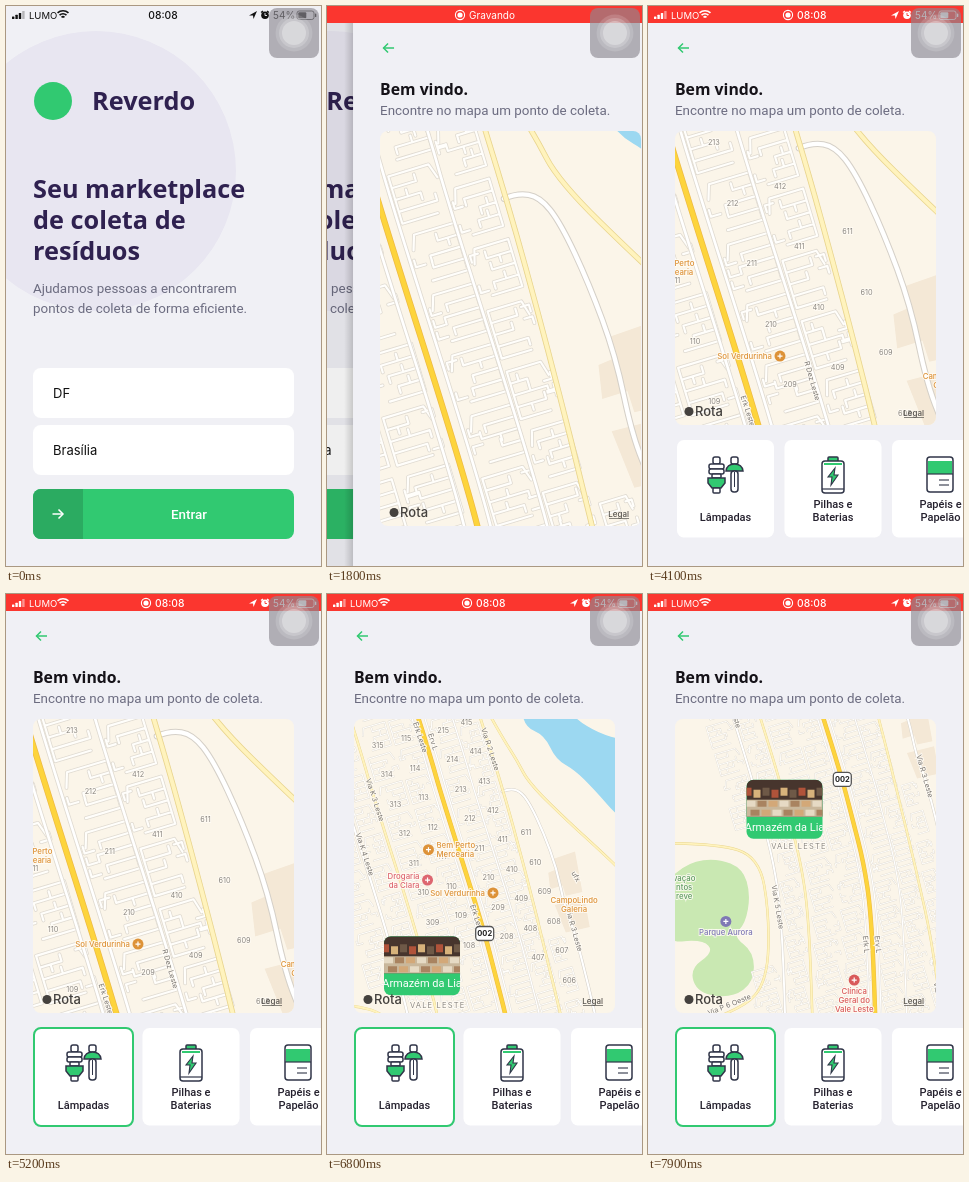
Write an HTML page with a canvas that moves like this. It is 315 px wide and 560 px high and loops after 8 s.

```html
<!DOCTYPE html>
<html lang="pt-BR">
<head>
<meta charset="utf-8">
<title>Coleta</title>
<style>
html, body { margin: 0; width: 100%; height: 100%; overflow: hidden; background: #f0f0f5; }
canvas { display: block; width: 315px; height: 560px; }
</style>
</head>
<body>
<canvas id="stage"></canvas>
<script>
const W = 315, H = 560, LOOP = 8000;
const canvas = document.getElementById('stage');
const ctx = canvas.getContext('2d');
const dpr = Math.max(1, window.devicePixelRatio || 1);
canvas.width = W * dpr;
canvas.height = H * dpr;

const GREEN = '#31c971', INK = '#2f2150', GREY = '#6c6c80', PAGE = '#f0f0f5';
const TITLE = '"Noto Sans", "Open Sans", sans-serif';
const BODY = 'Roboto, sans-serif';
const UI = 'Inter, sans-serif';

const clamp = v => Math.min(1, Math.max(0, v));
const mix = (a, b, k) => a + (b - a) * k;
const smooth = k => k * k * (3 - 2 * k);

function text(s, x, y, size, font, color, align = 'left', weight = 400) {
  ctx.font = `${weight} ${size}px ${font}`;
  ctx.fillStyle = color;
  ctx.textAlign = align;
  ctx.textBaseline = 'alphabetic';
  ctx.fillText(s, x, y);
}
function box(x, y, w, h, r, fill) {
  ctx.beginPath();
  ctx.roundRect(x, y, w, h, r);
  if (fill) { ctx.fillStyle = fill; ctx.fill(); }
}
function disc(x, y, r, fill) {
  ctx.beginPath();
  ctx.arc(x, y, r, 0, 7);
  ctx.fillStyle = fill;
  ctx.fill();
}
function line(color, width, ...pts) {
  ctx.beginPath();
  pts.forEach(([x, y]) => ctx.lineTo(x, y));
  ctx.strokeStyle = color;
  ctx.lineWidth = width;
  ctx.stroke();
}

// ---- Map geometry, in map units ----
const AXIS = [[28, 50], [52, 125], [60, 150], [80, 214], [91, 253], [136, 395], [150, 450],
  [163, 500], [172, 560], [177, 680], [178, 760]];
function axisX(y) {
  let i = 1;
  while (i < AXIS.length - 1 && AXIS[i][0 + 1] < y) i++;
  const [a, b] = [AXIS[i - 1], AXIS[i]];
  return mix(a[0], b[0], (y - a[1]) / (b[1] - a[1]));
}
function curve(pts, closed) {
  const p = new Path2D();
  p.moveTo(...pts[0]);
  for (let i = 1; i < pts.length - 1; i++) {
    const [x, y] = pts[i], [nx, ny] = pts[i + 1];
    p.quadraticCurveTo(x, y, (x + nx) / 2, (y + ny) / 2);
  }
  p.lineTo(...pts[pts.length - 1]);
  if (closed) p.closePath();
  return p;
}
const beside = dx => curve(AXIS.map(([x, y]) => [x + dx, y]));

const lake = curve([[140, 60], [152, 105], [162, 128], [178, 148], [180, 178], [203, 188], [215, 214],
  [236, 226], [256, 246], [288, 282], [340, 320], [340, 205], [288, 193], [262, 186], [236, 170],
  [224, 152], [203, 150], [208, 125], [200, 60]], true);
const park = curve([[-59, 514], [-43, 500], [-8, 496], [21, 508], [30, 538], [24, 573], [9, 587],
  [34, 606], [34, 641], [9, 660], [-32, 655], [-42, 626], [-13, 606], [-26, 591], [-75, 596], [-75, 520]], true);
const tan = new Path2D('M207 337L221 331L225 350L209 355ZM213 322L236 314L244 358L226 362ZM214 372L246 364L252 396L226 402Z');
const roadL2 = curve([[100, 60], [119, 125], [156, 240], [181, 331], [203, 419], [225, 510], [245, 600], [262, 740]]);
const roadL3 = curve([[157, 249], [164, 246], [176, 248], [187, 262], [202, 294], [216, 332], [225, 375],
  [235, 399], [252, 465], [268, 538], [300, 700]]);
const roadL4 = curve([[108, 80], [125, 125], [140, 160], [160, 195], [173, 215], [186, 240], [230, 283], [260, 310], [340, 386]]);
const parkRoad = curve([[-80, 478], [-10, 478], [40, 494], [52, 560], [50, 640], [20, 674], [-80, 705]]);

let seed = 11;
const rnd = () => (seed = (seed * 16807) % 2147483647) / 2147483647;

// Each block is a short comb of cul-de-sacs around a side street.
const lanes = new Path2D();
function block(cx, cy, w, h) {
  const go = (...pts) => pts.forEach(([x, y], i) =>
    lanes[i ? 'lineTo' : 'moveTo'](cx + x + 0.3 * y, cy + y - 0.3 * x));
  const side = rnd() < 0.5 ? -1 : 1, e = side * w / 2;
  go([e, -h / 2], [e, h / 2], [-e * 0.5, h / 2]);
  go([e, -h / 2], [-e * 0.7, -h / 2], [-e * 0.9, -h / 2 + h * 0.3]);
  for (let i = 1; i < 4; i++) {
    const y = -h / 2 + i * h / 4, x = e * (rnd() * 0.9 - 0.7), d = (rnd() < 0.5 ? -1 : 1) * h / 7;
    go([e, y], [x, y], [x, y + d]);
    if (rnd() < 0.6) go([(e + x) / 2, y], [(e + x) / 2, y - d]);
    if (rnd() < 0.5) go([-e, y], [-e, y + d], [-e * 0.6, y + d]);
  }
}
[[-20, 25], [-53, 27], [23, 25], [51, 21], [-90, 20], [-126, 28]].forEach(([dx, w], c) => {
  for (let k = -5; k < 15; k++) {
    const cy = 246 + 32 * k + (c % 2) * 8, cx = axisX(cy) + dx;
    if (c > 3 && cx < 48 && cy > 470) continue;
    block(cx, cy, w, 25);
  }
});
for (let k = 0; k < 6; k++) block(228 + k * 14, 118 + k * 10, 18, 18);
for (let k = 0; k < 8; k++) block(axisX(420 + k * 34) + 77, 420 + k * 34, 16, 24);

const frontage = [beside(-7), beside(7), beside(37)];
const pale = [beside(-74), parkRoad, roadL2, roadL4];
const white = [beside(-106), roadL3];
const main = beside(0);

// ---- Camera: time, scale, centre ----
const CAM = [[0, 1.89, 160.5, 317.7], [5400, 1.89, 160.5, 317.7], [6050, 1, 157.5, 272], [6250, 1, 157.5, 272],
  [7350, 0.85, 118.2, 387.2], [7430, 0.85, 118.2, 387.2], [7900, 0.85, 94.7, 504.8], [8000, 0.85, 94.7, 504.8]];
function camera(t) {
  let i = 1;
  while (i < CAM.length - 1 && CAM[i][0] < t) i++;
  const a = CAM[i - 1], b = CAM[i], k = smooth(clamp((t - a[0]) / (b[0] - a[0])));
  return { s: a[1] * Math.pow(b[1] / a[1], k), x: mix(a[2], b[2], k), y: mix(a[3], b[3], k) };
}

function cased(paths, edge, fill, outer, inner) {
  for (const [color, width] of [[edge, outer], [fill, inner]]) {
    ctx.strokeStyle = color;
    ctx.lineWidth = width;
    paths.forEach(p => ctx.stroke(p));
  }
}
function drawRoads(s) {
  ctx.lineJoin = ctx.lineCap = 'round';
  ctx.fillStyle = '#f4e8d6';
  ctx.fill(tan);
  ctx.fillStyle = '#c9e8b2';
  ctx.fill(park);
  ctx.fillStyle = '#9cd8f1';
  ctx.fill(lake);
  cased([lanes], '#e0dbd2', '#fffefb', 2, 1.15);
  cased(frontage, '#e0dbd2', '#fff', 2.3, 1.4);
  cased(white, '#d5d0c8', '#fff', 3.4, 2.3);
  cased(pale, '#e9d58f', '#fff3bd', 3, 2.1);
  cased([main], '#eebb45', '#fdd43c', 1.7 + 3 / s, 1.2 + 2.4 / s);
}

const STREETS = [
  ['Via K 3 Leste', 19, 258, 72, 0, 0.98], ['Via K 4 Leste', 8, 317, 72, 0, 0.98],
  ['Via K 5 Leste', 62, 553, 80, 0, 0.98], ['Via R 3 Leste', 235, 399, 74, 0, 9],
  ['Via R 2 Leste', 144, 203, 72, 0.8, 1.5], ['Via R 4 Leste', 164, 190, 62, 0.95, 1.5],
  ['R Dez Leste', 164, 372, 74, 1.4, 9], ['Erk Leste', 68, 190, 72, 0.92, 1.4],
  ['Erk Leste', 130, 388, 72, 0.92, 9], ['Erv L', 82, 195, 72, 0.92, 1.4],
  ['Erk L', 166, 597, 84, 0, 0.98], ['Erv L', 180, 597, 84, 0, 0.98],
  ['Via R 2', 251, 655, 78, 0, 0.98], ['Via P 6 Oeste', 5, 668, -22, 0, 0.98], ['ufx', 237, 341, 60, 0.92, 1.6]
];
const ORANGE = '#dd9238', PINK = '#dd6670', PURPLE = '#7f78b5';
// lines, position, text offset, alignment, colour, scale range, icon
const PLACES = [
  [['Bem Perto', 'Mercearia'], 77, 312, 8, 'left', ORANGE, 0.92, 9, 1],
  [['Sol Verdurinha'], 147, 359, -8, 'right', ORANGE, 0.92, 9, 1],
  [['Drogaria', 'da Clara'], 76, 345, -8, 'right', PINK, 0.92, 9, 1],
  [['CampoLindo', 'Galeria'], 235, 372, 0, 'center', ORANGE, 0.92, 9, 0],
  [['Parque Aurora'], 1, 570, 0, 'center', PURPLE, 0, 0.98, 2],
  [['Clínica', 'Geral do', 'Vale Leste'], 152, 639, 0, 'center', '#d95a5a', 0, 0.98, 2],
  [['vação', 'ntos', 'reve'], -48, 530, 0, 'center', '#5f9c62', 0, 0.98, 0]
];

function drawLabels(cam, cx, cy) {
  const at = (x, y) => [cx + (x - cam.x) * cam.s, cy + (y - cam.y) * cam.s];
  function halo(s, x, y, size, color, align, weight) {
    ctx.font = `${weight || 400} ${size}px ${UI}`;
    ctx.textAlign = align;
    ctx.textBaseline = 'alphabetic';
    ctx.strokeStyle = 'rgba(255,252,244,.85)';
    ctx.lineWidth = 2;
    ctx.strokeText(s, x, y);
    ctx.fillStyle = color;
    ctx.fillText(s, x, y);
  }
  const shown = (lo, hi) => cam.s >= lo && cam.s <= hi;

  if (cam.s > 0.92) {
    [[213, 246, 23, 217], [412, 269, 51, 415], [611, 293, 79, 611], [113, 255, -20, 116], [313, 262, -53, 315]]
      .forEach(([n, y0, dx, top]) => {
        for (let k = n - top; k < 6; k++) {
          const y = y0 + 32 * k;
          const [x, sy] = at(axisX(y) + dx, y);
          halo(n - k, x, sy + 3, 7.3, '#8b8782', 'center');
        }
      });
  }
  STREETS.forEach(([s, x, y, deg, lo, hi]) => {
    if (!shown(lo, hi)) return;
    ctx.save();
    ctx.translate(...at(x, y));
    ctx.rotate(deg * Math.PI / 180);
    halo(s, 0, 2.5, 7.2, '#77736f', 'center');
    ctx.restore();
  });
  PLACES.forEach(([rows, x, y, off, align, color, lo, hi, icon]) => {
    if (!shown(lo, hi)) return;
    const [px, py] = at(x, y);
    if (icon) {
      disc(px, py, 5.5, color);
      line('#fff', 1.2, [px - 2.5, py], [px + 2.5, py]);
      line('#fff', 1.2, [px, py - 2.5], [px, py + 2.5]);
    }
    const top = icon === 2 ? 14 : 3 - (rows.length - 1) * 4.5;
    rows.forEach((s, i) => halo(s, px + off, py + top + i * 9, 7.8, color, align, 500));
  });
  if (cam.s < 0.98) {
    const [x, y] = at(87, 481);
    ctx.letterSpacing = '1.2px';
    halo('VALE LESTE', x, y + 3, 7.5, '#8b8782', 'center');
    ctx.letterSpacing = '0px';
  }
  if (cam.s < 1.4) {
    const [x, y] = at(138, 403);
    box(x - 9, y - 7, 18, 14, 3.5, '#fff');
    ctx.strokeStyle = '#555';
    ctx.lineWidth = 1.3;
    ctx.stroke();
    text('002', x, y + 2.8, 7.5, UI, '#222', 'center', 700);
  }
}

function drawMarker(t, x, y) {
  ctx.save();
  ctx.translate(x - 38, y - 29.5);
  box(0, 0, 76, 59, 7, GREEN);
  ctx.clip();
  if (t > 6600) {
    ctx.fillStyle = '#47352d';
    ctx.fillRect(0, 0, 76, 37);
    for (let i = 0; i < 9; i++) {
      ctx.fillStyle = ['#b0533a', '#d7b27b', '#6e5947'][i % 3];
      ctx.fillRect(i * 9 - 2, 8 + i % 2 * 2, 7, 8);
    }
    ctx.fillStyle = '#c9b79b';
    ctx.fillRect(0, 20, 76, 17);
    for (let i = 0; i < 14; i++) {
      ctx.fillStyle = ['#e6dac4', '#a98360', '#d3a878'][i % 3];
      ctx.fillRect(i % 7 * 11 + (i > 6 ? 4 : 0), i > 6 ? 30 : 21, 9, 6);
    }
  }
  text('Armazém da Lia', 38, 51, 11, BODY, '#fff', 'center');
  ctx.restore();
}

function drawMap(t, h) {
  const cam = camera(t), cx = 157.5, cy = 125 + h / 2;
  ctx.save();
  box(27, 125, 261, h, 8, '#fbf5e9');
  ctx.clip();
  ctx.save();
  ctx.translate(cx, cy);
  ctx.scale(cam.s, cam.s);
  ctx.translate(-cam.x, -cam.y);
  drawRoads(cam.s);
  ctx.restore();
  if (t > 2400) drawLabels(cam, cx, cy);
  if (t > 5000) drawMarker(t, cx + (70 - cam.x) * cam.s, cy + (438 - cam.y) * cam.s);
  const base = 125 + h - 9;
  disc(41, base - 4.5, 4.5, '#44413e');
  text('Rota', 47, base, 13, UI, '#44413e', 'left', 500);
  text('Legal', 276, base, 8, UI, '#55524e', 'right', 500);
  line('#55524e', 0.7, [256, base + 1.5], [276, base + 1.5]);
  ctx.restore();
}

// ---- Item cards ----
function outline(fill, width = 1.5) {
  if (fill) { ctx.fillStyle = fill; ctx.fill(); }
  ctx.strokeStyle = '#303548';
  ctx.lineWidth = width;
  ctx.stroke();
}
function part(x, y, w, h, r, fill) { box(x, y, w, h, r); outline(fill); }
const icons = [
  () => {
    part(65, 451, 7, 7, 2, '#fff');
    part(61, 458, 15, 5, 2, '#fff');
    part(61, 463, 15, 5, 2, '#fff');
    part(64, 468, 9, 4, 1, '#fff');
    ctx.beginPath();
    ctx.moveTo(60, 472); ctx.lineTo(77, 472); ctx.lineTo(77, 477); ctx.lineTo(73, 482);
    ctx.lineTo(64, 482); ctx.lineTo(60, 477); ctx.closePath();
    outline(GREEN);
    part(65, 482, 7, 5, 1, '#fff');
    part(83, 451, 7, 7, 2, '#fff');
    ctx.beginPath();
    ctx.moveTo(78, 465); ctx.quadraticCurveTo(79, 458, 86.5, 458);
    ctx.quadraticCurveTo(94, 458, 95, 465); ctx.closePath();
    outline(GREEN);
    part(83, 465, 7, 21, 3, '#fff');
    line('#303548', 1, [86.5, 466], [86.5, 481]);
  },
  () => {
    part(180, 451, 10, 5, 1, GREEN);
    part(174, 455, 22, 32, 3, '#fff');
    line(GREEN, 2, [176, 458], [194, 458]);
    line('#303548', 1.2, [174, 483], [196, 483]);
    ctx.beginPath();
    ctx.moveTo(187, 462); ctx.lineTo(180, 471); ctx.lineTo(184, 471); ctx.lineTo(183, 479);
    ctx.lineTo(190, 469); ctx.lineTo(186, 469); ctx.closePath();
    outline(GREEN, 1.1);
  },
  () => {
    part(279, 451, 26, 35, 3, '#fff');
    box(280, 455, 24, 13, 0, GREEN);
    line('#303548', 1.2, [279, 468], [305, 468]);
    line('#303548', 1.1, [291, 474], [301, 474]);
    line('#303548', 1.1, [291, 479], [301, 479]);
  }
];
const ITEMS = [['Lâmpadas'], ['Pilhas e', 'Baterias'], ['Papéis e', 'Papelão']];
function drawCards(t) {
  const loaded = t > 3300, chosen = t > 4850;
  ITEMS.forEach((rows, i) => {
    const cx = 77.5 + i * 107.5;
    box(cx - 48.5, 434, 97, 97.5, 7, '#fff');
    if (!i && chosen) {
      box(28, 434, 99, 98, 7);
      ctx.strokeStyle = GREEN;
      ctx.lineWidth = 2;
      ctx.stroke();
    }
    if (loaded) icons[i]();
    const y = loaded ? 515 - (rows.length - 1) * 13 : 461;
    rows.forEach((s, k) => text(s, cx, y + k * 13, 11, BODY, '#25212e', 'center', 500));
  });
}

// ---- Pages ----
function arrow(x, y, dir, color) {
  const tip = x + 5 * dir;
  line(color, 1.5, [x - 5.5 * dir, y], [tip, y]);
  line(color, 1.5, [tip - 4.5 * dir, y - 4.5], [tip, y], [tip - 4.5 * dir, y + 4.5]);
}
function drawHome(t) {
  ctx.fillStyle = PAGE;
  ctx.fillRect(0, 0, W, H);
  disc(90, 165, 140, '#e8e6f1');
  disc(47, 95, 19, GREEN);
  text('Reverdo', 86, 104, 25.3, TITLE, INK, 'left', 700);
  ['Seu marketplace', 'de coleta de', 'resíduos'].forEach((s, i) =>
    text(s, 27, 192 + i * 31, 25.3, TITLE, INK, 'left', 700));
  text('Ajudamos pessoas a encontrarem', 27, 287, 13.4, BODY, GREY);
  text('pontos de coleta de forma eficiente.', 27, 307, 13.4, BODY, GREY);
  box(27, 362, 261, 50, 8, '#fff');
  box(27, 419, 261, 50, 8, '#fff');
  text('DF', 47, 392, 13, UI, '#111');
  text('Brasília', 47, 448.5, 13, UI, '#111');
  box(27, 483, 261, 50, 8, GREEN);
  box(27, 483, 50, 50, [8, 0, 0, 8], '#2bab61');
  arrow(52, 508, 1, '#fff');
  text('Entrar', 183, 512.5, 13.4, BODY, '#fff', 'center', 500);
  if (t > 1350) box(27, 483, 261, 50, 8, 'rgba(0,0,0,.06)');
}
function drawPoints(t) {
  ctx.fillStyle = PAGE;
  ctx.fillRect(0, 0, W, H);
  arrow(35.5, 42, -1, GREEN);
  text('Bem vindo.', 27, 89, 15.8, TITLE, '#151218', 'left', 700);
  text('Encontre no mapa um ponto de coleta.', 27, 108.5, 13.4, BODY, GREY);
  const cards = t > 2350;
  drawMap(t, cards ? 294 : 395);
  if (cards) drawCards(t);
}

function recordDot(x) {
  ctx.beginPath();
  ctx.arc(x, 9, 4.6, 0, 7);
  ctx.strokeStyle = '#fff';
  ctx.lineWidth = 1.1;
  ctx.stroke();
  disc(x, 9, 2.6, '#fff');
}
function drawStatus(t) {
  const live = t >= 500, ink = live ? '#fff' : '#111';
  if (live) {
    const dip = Math.exp(-Math.pow((t - 3000) / 260, 2));
    ctx.fillStyle = `rgb(${mix(251, 209, dip)},${mix(54, 33, dip)},${mix(47, 30, dip)})`;
    ctx.fillRect(0, 0, W, 17);
  }
  if (live && t < 3900) {
    recordDot(133);
    text('Gravando', 142, 12.8, 10, UI, ink);
    return;
  }
  for (let i = 0; i < 4; i++) box(6 + i * 3.4, 10.5 - i * 1.8, 2.4, 2.5 + i * 1.8, 0.5, i < 3 ? ink : live ? '#ffffff77' : '#1114');
  text('LUMO', 23, 12.8, 9.5, UI, ink);
  ctx.strokeStyle = ink;
  ctx.lineWidth = 1.6;
  [3, 6, 9].forEach(r => {
    ctx.beginPath();
    ctx.arc(57, 13, r - 0.8, -2.3, -0.84);
    ctx.stroke();
  });
  if (live) recordDot(140);
  text('08:08', live ? 149 : 157, 12.8, 10.3, UI, ink, live ? 'left' : 'center', 500);
  ctx.beginPath();
  [[243, 9.5], [251, 5], [247.5, 13], [247, 9.5]].forEach(p => ctx.lineTo(...p));
  ctx.fillStyle = ink;
  ctx.fill();
  disc(259, 9.3, 3.8, ink);
  line(live ? '#fb362f' : PAGE, 0.9, [259, 7], [259, 9.5], [261, 9.5]);
  line(ink, 1.3, [255, 6.5], [257, 5]);
  line(ink, 1.3, [261, 5], [263, 6.5]);
  text('54%', 267, 12.8, 10, UI, ink);
  box(291, 5, 17, 8.5, 2.2);
  ctx.strokeStyle = ink;
  ctx.lineWidth = 0.8;
  ctx.stroke();
  box(292.3, 6.3, 8, 5.9, 1, ink);
  box(309, 7.5, 1.3, 3.5, 0.6, ink);
}
function drawAssist() {
  box(263, 2, 50, 50, 8, 'rgba(142,138,146,.64)');
  disc(288, 27, 18.5, 'rgba(255,255,255,.14)');
  disc(288, 27, 15, 'rgba(255,255,255,.2)');
  disc(288, 27, 12, 'rgba(255,255,255,.3)');
}

// Critically damped push, started when the button is released.
function remaining(t) {
  if (t < 1575) return 1;
  const k = 18.26 * (t - 1575) / 1000, r = (1 + k) * Math.exp(-k);
  return r < 0.004 ? 0 : r;
}

function draw(t) {
  ctx.setTransform(dpr, 0, 0, dpr, 0, 0);
  const rest = remaining(t), x = W * rest;
  if (rest > 0) {
    ctx.save();
    ctx.translate(-0.3 * W * (1 - rest), 0);
    drawHome(t);
    ctx.restore();
    if (rest < 1) {
      ctx.fillStyle = `rgba(0,0,0,${0.07 * (1 - rest)})`;
      ctx.fillRect(0, 0, x, H);
      const shade = ctx.createLinearGradient(x - 9, 0, x, 0);
      shade.addColorStop(0, 'rgba(0,0,0,0)');
      shade.addColorStop(1, 'rgba(0,0,0,.16)');
      ctx.fillStyle = shade;
      ctx.fillRect(x - 9, 0, 9, H);
    }
  }
  if (rest < 1) {
    ctx.save();
    ctx.translate(x, 0);
    drawPoints(t);
    ctx.restore();
  }
  drawStatus(t);
  drawAssist();
}

const start = performance.now();
function tick() {
  draw((performance.now() - start) % LOOP);
  requestAnimationFrame(tick);
}
tick();
</script>
</body>
</html>
```
